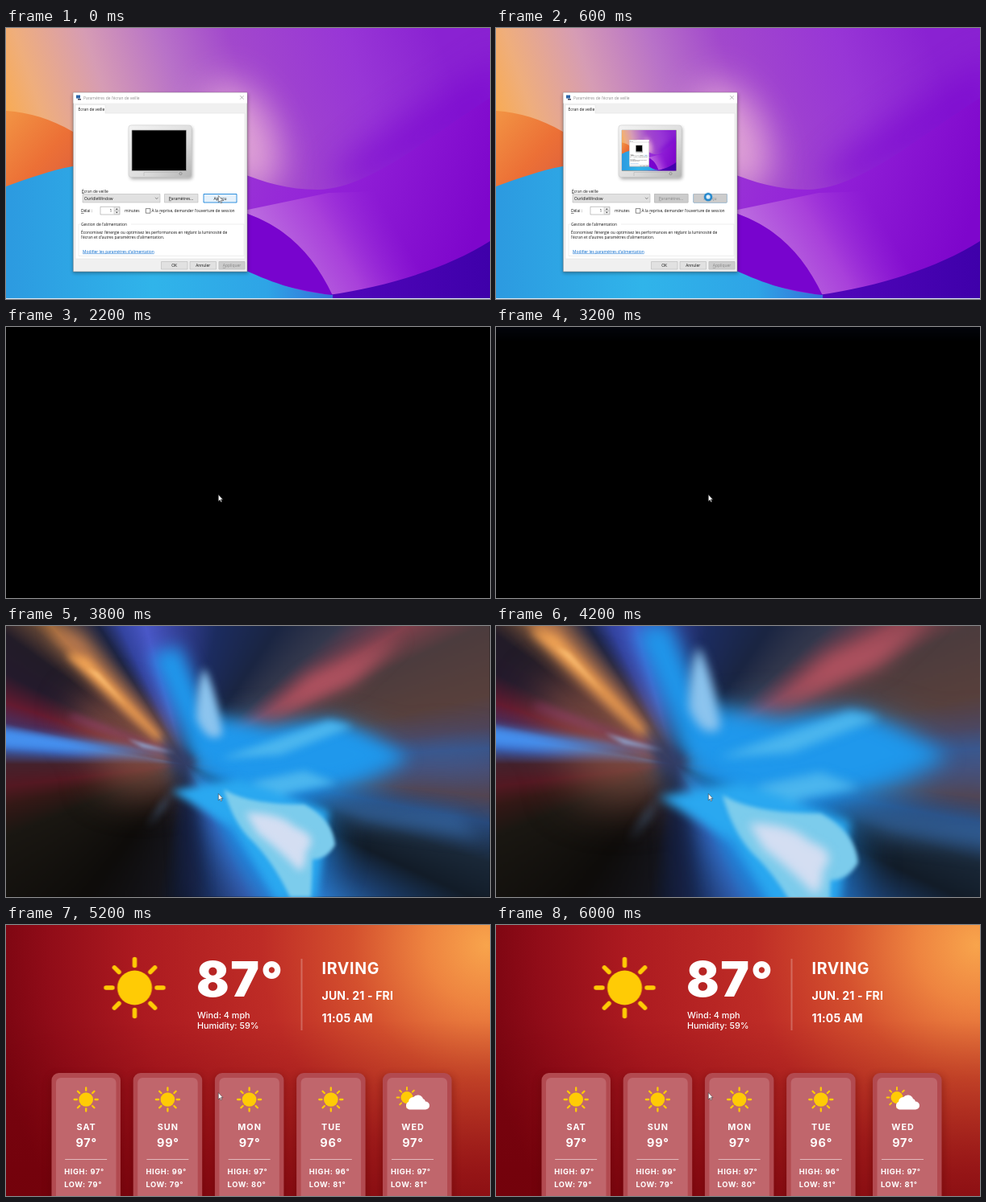
Recreate the animation shown at these times as an HTML page. Size 600 px wide and 337 px high, loop 8 s.

```html
<!DOCTYPE html>
<html lang="fr">
<head>
<meta charset="utf-8">
<title>Écran de veille</title>
<style>
html, body { margin: 0; width: 100%; height: 100%; overflow: hidden; background: #000; }
svg { display: block; width: 100vw; height: 100vh; }
text { white-space: pre; }

#desktop, #blank, #black, #streaks, #weather, #data, #arrow, #ring, #off, #preview, #sky, #bigSun, #rule {
  animation: 8s step-end infinite;
}
#desktop { animation-name: desktop; }
#off { animation-name: off; }
#preview { animation-name: preview; }
#blank { animation-name: blank; }
#black { animation-name: black; }
#sky { animation-name: sky; }
#streaks { animation-name: streaks; transform-origin: 222px 172px; }
#weather { animation-name: weather; }
#data { animation-name: data; }
#arrow { animation-name: arrow; }
#ring { animation-name: ring; }
#bigSun { animation-name: bigSun; }
#rule { animation-name: rule; transform-origin: 0 42px; }

@keyframes desktop { 0% { opacity: 1 } 10% { opacity: 0 } }
@keyframes off { 0% { opacity: 0 } 2.5% { opacity: 1 } }
@keyframes preview { 0% { opacity: 0 } 5% { opacity: 1 } }
@keyframes blank { 0% { opacity: 0 } 10% { opacity: 1 } 25% { opacity: 0 } }
@keyframes black { 0% { opacity: 0 } 25% { opacity: 1 } }
@keyframes sky { 0% { opacity: 0 } 40% { opacity: .15 } 42.5% { opacity: .3 } 45% { opacity: .45 } 47.5% { opacity: 0 } }
@keyframes streaks {
  0% { opacity: 0; transform: scale(1) }
  47.5% { opacity: 1; transform: scale(1) }
  50% { opacity: 1; transform: scale(1.1) }
  52.5% { opacity: 1; transform: scale(1.22) }
  55% { opacity: 1; transform: scale(1.35) }
  57.5% { opacity: 0 }
}
@keyframes weather { 0% { opacity: 0 } 55% { opacity: .55 } 57.5% { opacity: 1 } }
@keyframes data { 0% { opacity: 0 } 60% { opacity: 1 } }
@keyframes bigSun { 0% { transform: translate(173px, 78px) } 60% { transform: translate(159.5px, 78px) } }
@keyframes rule { 0% { transform: translate(358.5px, 0) scaleY(.935) } 60% { transform: translate(366.5px, 0) } }
@keyframes arrow { 0% { opacity: 1 } 2.5% { opacity: 0 } 10% { opacity: 1 } }
@keyframes ring {
  0% { opacity: 0; transform: translate(263px, 210px) scale(1.3) }
  2.5% { opacity: 1; transform: translate(263px, 210px) scale(1.3) }
  10% { opacity: 1; transform: translate(269.3px, 209.8px) }
  22.5% { opacity: 0 }
}

.ui { font: 4.93px "Open Sans", "Noto Sans", sans-serif; fill: #111; }
.ui .mid { text-anchor: middle; }
.btn { fill: #e1e1e1; stroke: #adadad; stroke-width: .5; }
.dim { fill: #ccc; stroke: #bfbfbf; stroke-width: .9; }
.gray { fill: #858585; }
.u { text-decoration: underline; }
.b2 { filter: blur(2px); } .b5 { filter: blur(5px); }
.b10 { filter: blur(10px); } .b22 { filter: blur(22px); }
#rayFan {
  width: 600px; height: 337px;
  background: conic-gradient(at 222px 172px,
    #303c8c, #1c2c60 13deg, #1a2542 34deg, #34384c 48deg, #80404c 58deg, #4c3c3e 65deg,
    #58403c 77deg, #504458 83deg, #3a5488 87deg, #4a4c70 91deg, #544450 96deg, #284a7c 101deg,
    #1a2838 108deg, #121c28 115deg, #1c4070 124deg, #2c78c8 134deg, #2c8ce0 145deg, #3458a8 155deg,
    #1a3060 170deg, #101c38 179deg, #14141a 192deg, #0e0c0a 217deg, #1a1712 248deg, #341816 257deg,
    #541822 263deg, #44222c 270deg, #3a62b8 275.5deg, #3c86ec 279deg, #483060 283deg, #641a30 289deg,
    #241a2c 297deg, #221c28 306deg, #5a4034 312deg, #a06a3c 316deg, #5c4640 320deg, #1c2444 328deg,
    #3444a0 335deg, #4a58c8 344deg, #303c8c);
}
#weather { font-family: Inter, "Open Sans", sans-serif; font-weight: 700; fill: #fff; }
.day { text-anchor: middle; }
</style>
</head>
<body>
<svg viewBox="0 0 600 337" preserveAspectRatio="none">
<defs>
  <linearGradient id="wallBase" gradientUnits="userSpaceOnUse" x1="0" y1="130" x2="520" y2="-40">
    <stop stop-color="#faaa4c"/><stop offset=".09" stop-color="#efae7c"/>
    <stop offset=".24" stop-color="#d69cb4"/><stop offset=".4" stop-color="#b872c8"/>
    <stop offset=".55" stop-color="#a248cc"/><stop offset=".8" stop-color="#9836d6"/>
    <stop offset="1" stop-color="#8a22d2"/>
  </linearGradient>
  <linearGradient id="sheet" x1="0" x2="1" y1=".2" y2=".5">
    <stop stop-color="#9a34d6"/><stop offset=".35" stop-color="#9424d8"/><stop offset="1" stop-color="#7e06cc"/>
  </linearGradient>
  <linearGradient id="fold" gradientUnits="userSpaceOnUse" x1="340" y1="300" x2="470" y2="225">
    <stop stop-color="#bc6ce0"/><stop offset=".5" stop-color="#a840da"/><stop offset="1" stop-color="#9424d8" stop-opacity="0"/>
  </linearGradient>
  <linearGradient id="deep" x1="0" x2="1">
    <stop stop-color="#5206bc"/><stop offset="1" stop-color="#3f00aa"/>
  </linearGradient>
  <linearGradient id="amber" x1="0" x2="1" y1="0" y2=".8">
    <stop stop-color="#f29444"/><stop offset=".5" stop-color="#ec7036"/><stop offset="1" stop-color="#d85a40"/>
  </linearGradient>
  <linearGradient id="sea" x1="0" x2="1">
    <stop stop-color="#2c9ae0"/><stop offset=".45" stop-color="#30b4ea"/>
    <stop offset=".8" stop-color="#2ea4e6"/><stop offset="1" stop-color="#3470d8"/>
  </linearGradient>
  <linearGradient id="metal" x1="0" x2="1" y1="0" y2="1">
    <stop stop-color="#f4f4f4"/><stop offset=".6" stop-color="#dcdcdc"/><stop offset="1" stop-color="#b4b4b4"/>
  </linearGradient>
  <radialGradient id="heat" gradientUnits="userSpaceOnUse" cx="596" cy="25" r="620">
    <stop stop-color="#f8a44c"/><stop offset=".12" stop-color="#ee8440"/>
    <stop offset=".27" stop-color="#d4502e"/><stop offset=".45" stop-color="#be2c26"/>
    <stop offset=".7" stop-color="#ac1a20"/><stop offset=".88" stop-color="#900c18"/>
    <stop offset="1" stop-color="#780410"/>
  </radialGradient>
  <linearGradient id="shade" x2="0" y2="1">
    <stop offset=".35" stop-color="#700008" stop-opacity="0"/><stop offset="1" stop-color="#700008" stop-opacity=".6"/>
  </linearGradient>
  <linearGradient id="topGlow" x2="0" y2="1">
    <stop stop-color="#16204a"/><stop offset="1" stop-color="#000"/>
  </linearGradient>
  <clipPath id="stage"><path d="M0 0H600V337H0Z"/></clipPath>

  <g id="wall" clip-path="url(#stage)">
    <path fill="url(#wallBase)" d="M0 0H600V337H0Z"/>
    <ellipse class="b22" cx="292" cy="135" rx="42" ry="72" transform="rotate(-25 292 135)" fill="#e8aed8" opacity=".85"/>
    <path class="b22" d="M620 30C540 90 460 120 400 190L440 200L620 110Z" fill="#7c08d0" opacity=".75"/>
    <path d="M290 180C320 192 350 201 386 201C450 200 520 138 600 87V337H290Z" fill="url(#sheet)"/>
    <path d="M290 228C345 245 380 280 405 333L520 310L560 200L400 205Z" fill="url(#fold)"/>
    <path d="M290 228C345 245 380 280 405 333L290 310Z" fill="#7804ce"/>
    <path d="M400 332C470 322 545 300 600 265V337H390Z" fill="url(#deep)"/>
    <path d="M0 103C30 105 55 113 83 129L120 150V210H0Z" fill="url(#amber)"/>
    <path d="M0 197C28 187 55 177 83 172L270 190L290 298C325 315 360 328 405 332V337H0Z" fill="url(#sea)"/>
    <path d="M0 336H600V337H0Z" fill="#dce8f4"/>
  </g>

  <g id="dialog" class="ui">
    <rect class="b2" x="83" y="82" width="217" height="223" opacity=".35"/>
    <path fill="#f0f0f0" stroke="#777" stroke-width=".5" d="M83.3 80.3H299V303H83.3Z"/>
    <path fill="#fff" d="M83.5 80.5H298.8V93.5H83.5Z"/>
    <path fill="#2b65a8" d="M87 83.5h5v4h-5z"/><path fill="#445" d="M89 88h4v1.5h-4z"/>
    <text x="96" y="88.7" fill="#8c8c8c">Paramètres de l'écran de veille</text>
    <path d="M290.2 84.2l4.4 4.4m0-4.4l-4.4 4.4" stroke="#888" stroke-width=".6"/>
    <path fill="#fff" stroke="#dcdcdc" stroke-width=".5" d="M86 106V95.5H123V106H296V287H86Z"/>
    <text x="89.5" y="102.6">Écran de veille</text>

    <rect class="b2" x="154" y="123" width="77" height="65" rx="3" opacity=".35"/>
    <rect x="152" y="121" width="78" height="64.5" rx="3" fill="url(#metal)" stroke="#c4c4c4" stroke-width=".5"/>
    <path fill="#000" stroke="#aaa" stroke-width=".7" d="M156 127H223.5V177.500H156Z"/>
    <path d="M171 184v-4.5h42" fill="none" stroke="#aaa" stroke-width=".5"/>
    <circle cx="216.5" cy="181" r="1.6" fill="none" stroke="#777" stroke-width=".6"/>

    <text x="94" y="204.5"><tspan class="u">É</tspan>cran de veille</text>
    <path class="btn" d="M95 206.5H191V217H95Z"/>
    <text x="97" y="213.6">OurIdleWindow</text>
    <path d="M185 210.8l1.800 1.8l1.8-1.8" fill="none" stroke="#444" stroke-width=".6"/>
    <path class="btn" d="M196.5 206.5H238V217H196.5Z"/>
    <text class="mid" x="217" y="213.6"><tspan class="u">P</tspan>aramètres...</text>
    <path fill="#e5f1fb" stroke="#0078d7" stroke-width=".8" d="M245 206.5H286V217H245Z"/>
    <text class="mid" x="265.5" y="213.6">Ap<tspan class="u">e</tspan>rçu</text>

    <text x="93" y="229"><tspan class="u">D</tspan>élai :</text>
    <path fill="#fff" stroke="#888" stroke-width=".5" d="M117 222.3H141V232H117Z"/>
    <text x="128.5" y="229">1</text>
    <path fill="#eee" stroke="#aaa" stroke-width=".4" d="M134 222.8h6.5v4.3H134zM134 227.2h6.5v4.3H134z"/>
    <path d="M136 225.8l1.3-1.6l1.3 1.6zM136 228.7l1.3 1.6l1.3-1.6z" fill="#222"/>
    <text x="147" y="229">minutes</text>
    <path fill="#fff" stroke="#333" stroke-width=".6" d="M173.3 224.6h5.6v5.6h-5.6z"/>
    <text x="180.5" y="229.3">À la <tspan class="u">r</tspan>eprise, demander l'ouverture de session</text>

    <path d="M92 244H90V283.5H295V244H155" fill="none" stroke="#dcdcdc" stroke-width=".5"/>
    <text x="93" y="246">Gestion de l'alimentation</text>
    <text x="93" y="255.5">Économisez l'énergie ou optimisez les performances en réglant la luminosité de</text>
    <text x="93" y="262.3">l'écran et d'autres paramètres d'alimentation.</text>
    <text class="u" x="95" y="279.6" fill="#0066cc">Modifier les paramètres d'alimentation</text>

    <path class="btn" d="M192.5 290.5H225V300H192.5ZM228 290.5H260.5V300H228Z"/>
    <path class="dim" d="M264 290.5H296V300H264Z"/>
    <text class="mid" x="208.7" y="297">OK</text>
    <text class="mid" x="244.2" y="297">Annuler</text>
    <text class="mid gray" x="280" y="297"><tspan class="u">A</tspan>ppliquer</text>
  </g>

  <g id="sun">
    <circle r="21.5" fill="#ffcb05"/>
    <g id="rays" stroke="#ffcb05" stroke-width="5.5" stroke-linecap="round"></g>
  </g>
</defs>

<g id="desktop">
  <use href="#wall"/>
  <use href="#dialog"/>
  <g id="off" class="ui">
    <path class="dim" d="M196.5 206.5H238V217H196.5ZM245 206.5H286V217H245Z"/>
    <text class="mid gray" x="217" y="213.6"><tspan class="u">P</tspan>aramètres...</text>
    <text class="mid gray" x="265.5" y="213.6">Ap<tspan class="u">e</tspan>rçu</text>
  </g>
  <g id="preview">
    <g transform="translate(156 127) scale(.1125 .15)"><use href="#wall"/><use href="#dialog"/></g>
  </g>
</g>

<path id="blank" fill="#f0eff2" d="M0 0H600V337H0Z"/>
<path id="black" d="M0 0H600V337H0Z"/>
<path id="sky" fill="url(#topGlow)" d="M0 0H600V19H0Z"/>

<g id="streaks">
  <foreignObject width="600" height="337"><div id="rayFan"></div></foreignObject>
  <g class="b22">
    <ellipse cx="345" cy="168" rx="135" ry="42" fill="#1c90e8"/>
    <ellipse cx="335" cy="250" rx="62" ry="85" transform="rotate(-28 335 250)" fill="#1c80d8" opacity=".9"/>
    <ellipse cx="150" cy="135" rx="75" ry="38" transform="rotate(28 150 135)" fill="#9a5a48" opacity=".7"/>
    <ellipse cx="170" cy="190" rx="60" ry="25" fill="#7a4a40" opacity=".7"/>
    <ellipse cx="540" cy="165" rx="70" ry="20" fill="#3a62a0" opacity=".5"/>
  </g>
  <g class="b10">
    <path fill="#1f98ec" d="M232 165L180 35L215 25L252 110L330 130L410 118L500 165L410 195L300 205Z"/>
    <path fill="#b05260" d="M310 125L375 62L490 15L430 72Z"/>
    <path fill="#c07c50" d="M212 165L60 5L90 15Z" stroke="#c07c50" stroke-width="8"/>
    <path fill="#3a70b0" d="M380 210L560 235L590 265L440 245Z" opacity=".6"/>
    <path fill="#1a2244" d="M214 195L200 115L228 165L238 337H222Z" opacity=".85"/>
  </g>
  <g class="b5">
    <path fill="#f4aa5c" d="M190 140L78 36L100 42Z" stroke="#f0a050" stroke-width="5"/>
    <path fill="#4690ee" d="M212 160L-10 128V150Z"/>
    <path fill="#b84890" d="M200 155L80 112L110 124Z" stroke="#a04080" stroke-width="3"/>
    <path fill="#8cc4ee" d="M236 115Q236 72 246 52Q262 85 268 135Q250 148 236 115Z"/>
    <path fill="#4cb6ee" d="M265 165L400 118L430 125L340 160ZM250 205L370 180L410 195L330 212Z"/>
    <path fill="#5a98d8" d="M205 205L175 250L195 225Z"/>
    <path fill="#2aa8f0" d="M205 205L290 190L400 230L385 340H335L280 250Z"/>
    <path fill="#343c66" d="M190 135L235 165L228 185L205 175Z" opacity=".8"/>
  </g>
  <g class="b2">
    <path fill="#7cccec" d="M270 203Q300 222 370 222Q405 240 408 272Q398 290 380 290L378 337H352Q330 290 300 262Q280 240 270 203Z"/>
    <path fill="#ffc87c" d="M150 100L100 52L114 58Z" opacity=".7"/>
    <path fill="#98ccff" d="M210 158L150 140L170 151Z" opacity=".7"/>
  </g>
  <path class="b5" fill="#d4def2" d="M297 232Q340 232 358 250Q390 262 372 280Q372 300 364 305Q335 275 312 258Z"/>
</g>

<g id="weather">
  <path fill="url(#heat)" d="M0 0H600V337H0Z"/>
  <path fill="url(#shade)" d="M0 0H600V337H0Z"/>
  <g id="bigSun"><use href="#sun"/></g>
  <path id="rule" d="M0 42V131" stroke="#fff" stroke-opacity=".55" stroke-width=".9"/>
  <g id="cards"></g>
  <g id="data">
    <text x="236" y="89" font-size="60" font-weight="900" letter-spacing="1.5">87°</text>
    <g font-size="10.8" font-weight="500">
      <text x="237" y="116">Wind: 4 mph</text>
      <text x="237" y="128.5">Humidity: 59%</text>
    </g>
    <text x="391.5" y="61" font-size="19.5" letter-spacing=".7">IRVING</text>
    <g font-size="14" letter-spacing=".2">
      <text x="391.5" y="93">JUN. 21 - FRI</text>
      <text x="391.5" y="121">11:05 AM</text>
    </g>
  </g>
</g>

<g id="ring">
  <circle r="3" fill="#e4f3fc" stroke="#1c84cc" stroke-width="2"/>
</g>
<path id="arrow" d="M263.3 208.5V216.800L265.2 215.1L266.5 217.8L267.7 217.2L266.5 214.6H268.9Z" fill="#fff" stroke="#222" stroke-width=".5"/>
</svg>

<script>
const byId = id => document.getElementById(id);
const days = [["SAT", 97, 79], ["SUN", 99, 79], ["MON", 97, 80], ["TUE", 96, 81], ["WED", 97, 81]];
const cloud = '<path fill="#fff" d="M500 229.5a5 5 0 0 1-1-9.5a6 6 0 0 1 6-6a7 7 0 0 1 12 2a5 5 0 0 1 3 3.5a5 5 0 0 1 0 10z"/>';

byId("rays").innerHTML = Array.from({ length: 8 }, (_, i) =>
  `<path d="M0 -27.5V-35.5" transform="rotate(${i * 45})"/>`).join("");

let cards = "", labels = "";
days.forEach(([name, high, low], i) => {
  const mid = 99.2 + i * 101.2;
  const last = i === 4;
  const left = last ? 467 : 56.5 + i * 101.2;
  const sun = last ? "translate(497 214.5) scale(.35)" : `translate(${mid} 217) scale(.41)`;
  cards += `<rect class="b5" x="${left - 3}" y="186" width="91" height="170" rx="10" fill="#500" opacity=".3"/>
    <rect x="${left}" y="184" width="85.5" height="180" rx="9" fill="#b24a50"/>
    <rect x="${left + 5.5}" y="190" width="74.5" height="180" rx="6" fill="#c0666c"/>
    <use href="#sun" transform="${sun}"/>${last ? cloud : ""}
    <path d="M${mid - 26} 291.5h52" stroke="#fff" stroke-opacity=".6" stroke-width=".9"/>`;
  labels += `<text class="day" x="${mid + .5}" y="255.3" font-size="10.8" letter-spacing="1">${name}</text>
    <text class="day" x="${mid + .5}" y="276" font-size="14.5" letter-spacing=".8">${high}°</text>
    <g font-size="9.3" letter-spacing=".6">
      <text x="${mid - 27}" y="310">HIGH: ${high}°</text>
      <text x="${mid - 27}" y="326">LOW: ${low}°</text>
    </g>`;
});
byId("cards").innerHTML = cards;
byId("data").insertAdjacentHTML("beforeend", labels);
</script>
</body>
</html>
```
